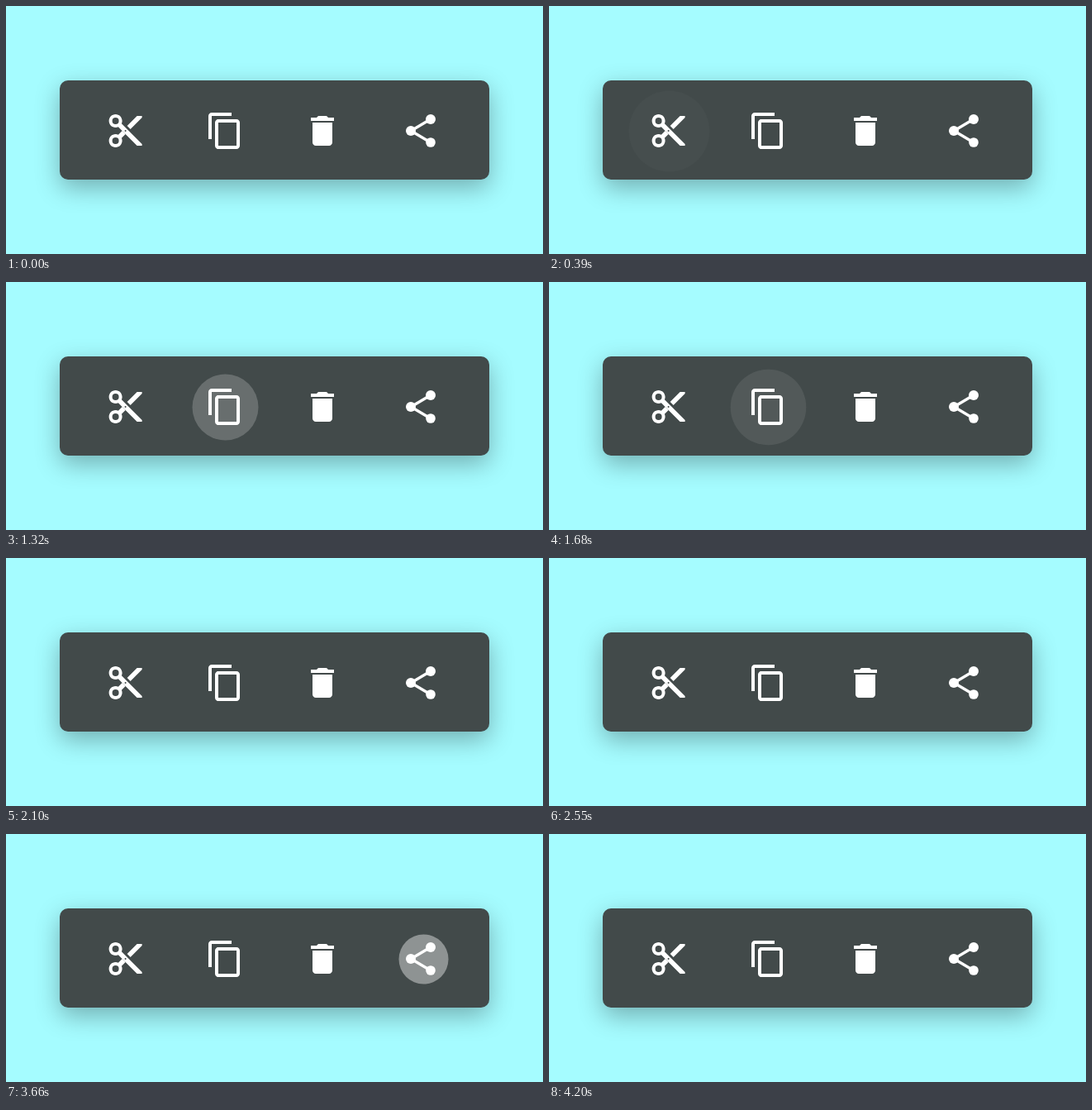
Write an HTML page that moves like this. It is 650 by 300 pixels and loops after 5.4 s.

```html
<!DOCTYPE html>
<html lang="en">
<head>
<meta charset="utf-8">
<title>Toolbar icons</title>
<style>
  html, body { margin: 0; width: 100%; height: 100%; overflow: hidden; background: #a5fcff; }
  .bar {
    position: absolute; left: 65px; top: 90px; width: 520px; height: 120px;
    border-radius: 10px; background: #424a4a; box-shadow: 0 10px 30px rgba(0, 0, 0, .3);
  }
  svg { position: absolute; left: 0; top: 0; fill: #fff; }
</style>
</head>
<body>
<div class="bar"></div>
<svg width="650" height="300" viewBox="0 0 650 300">
  <circle id="ripple" cy="151.5" r="0"/>

  <g transform="translate(120.6 127) scale(2)" fill-rule="evenodd">
    <path id="bladeDown" d="M9.64 7.64c.23-.5.36-1.05.36-1.64 0-2.21-1.79-4-4-4S2 3.79 2 6s1.79 4 4 4c.59 0 1.14-.13 1.64-.36L19 21h3v-1z
      M6 8a2 2 0 1 1 0-4 2 2 0 0 1 0 4z M12 12.5a.5.5 0 1 1 0-1 .5.5 0 0 1 0 1z"/>
    <path id="bladeUp" d="M10 12l-2.36 2.36C7.14 14.13 6.59 14 6 14c-2.21 0-4 1.79-4 4s1.79 4 4 4 4-1.79 4-4c0-.59-.13-1.14-.36-1.64L12 14z
      M6 20a2 2 0 1 1 0-4 2 2 0 0 1 0 4z M19 3l-6 6 2 2 7-7V3z"/>
  </g>

  <g transform="translate(241 127) scale(2)">
    <path d="M16 1H4c-1.1 0-2 .9-2 2v14h2V3h12z"/>
    <path id="page" d="M19 5H8c-1.1 0-2 .9-2 2v14c0 1.1.9 2 2 2h11c1.1 0 2-.9 2-2V7c0-1.1-.9-2-2-2zm0 16H8V7h11z"/>
  </g>

  <g transform="translate(359 127) scale(2)">
    <path d="M6 19c0 1.1.9 2 2 2h8c1.1 0 2-.9 2-2V7H6z"/>
    <path id="lid" d="M19 4h-3.5l-1-1h-5l-1 1H5v2h14z"/>
  </g>

  <g transform="translate(478 127) scale(2)">
    <path id="links" d="M8 10.83L16 6.17M8 13.17L16 17.83" fill="none" stroke="#fff" stroke-width="1.72"/>
    <circle cx="18" cy="5" r="3"/>
    <circle cx="6" cy="12" r="3"/>
    <circle cx="18" cy="19" r="2.92"/>
  </g>
</svg>
<script>
  const LOOP = 5400, STEP = 30, DELAY = 150, TURN = 1050, TWEEN = 300;
  const RIPPLE_X = [145.5, 265.5, 382.5, 505.5];
  const LINK_LENGTH = Math.hypot(8, 4.66);

  const part = id => document.getElementById(id);
  const set = (id, name, value) => part(id).setAttribute(name, value);
  const circOut = p => Math.sqrt(1 - (1 - p) ** 2);
  const quadOut = p => 1 - (1 - p) ** 2;

  // Each pose takes the remaining distance from rest, 1 down to 0.
  const poses = [
    left => {
      set('bladeDown', 'transform', `rotate(${-24 * left} 12 12)`);
      set('bladeUp', 'transform', `rotate(${24 * left} 12 12)`);
    },
    left => set('page', 'transform', `translate(${-2.5 * left} ${-2.5 * left})`),
    left => set('lid', 'transform', `translate(0 ${-left}) rotate(${20 * left} 12 4.5)`),
    left => {
      set('links', 'stroke-dasharray', `${LINK_LENGTH * (1 - left)} ${LINK_LENGTH + 1}`);
      set('links', 'visibility', left < 1 ? 'visible' : 'hidden');
    }
  ];

  function draw(time) {
    const active = Math.floor((time - DELAY) / TURN);
    const local = time - DELAY - active * TURN;

    // Two ripples, then the icon settles back into place.
    const rippling = active in RIPPLE_X && local < 2 * TWEEN;
    const grown = rippling ? circOut(local % TWEEN / TWEEN) : 0;
    set('ripple', 'cx', RIPPLE_X[active] || 0);
    set('ripple', 'r', 50 * grown);
    set('ripple', 'opacity', 1 - grown);

    const settle = (local - 2 * TWEEN) / TWEEN;
    poses.forEach((pose, i) =>
      pose(i === active && settle >= 0 && settle < 1 ? 1 - quadOut(settle) : 0));
  }

  function tick() {
    const time = Math.floor((performance.now() + .5) / STEP) * STEP;
    draw(time % LOOP);
    requestAnimationFrame(tick);
  }
  tick();
</script>
</body>
</html>
```
